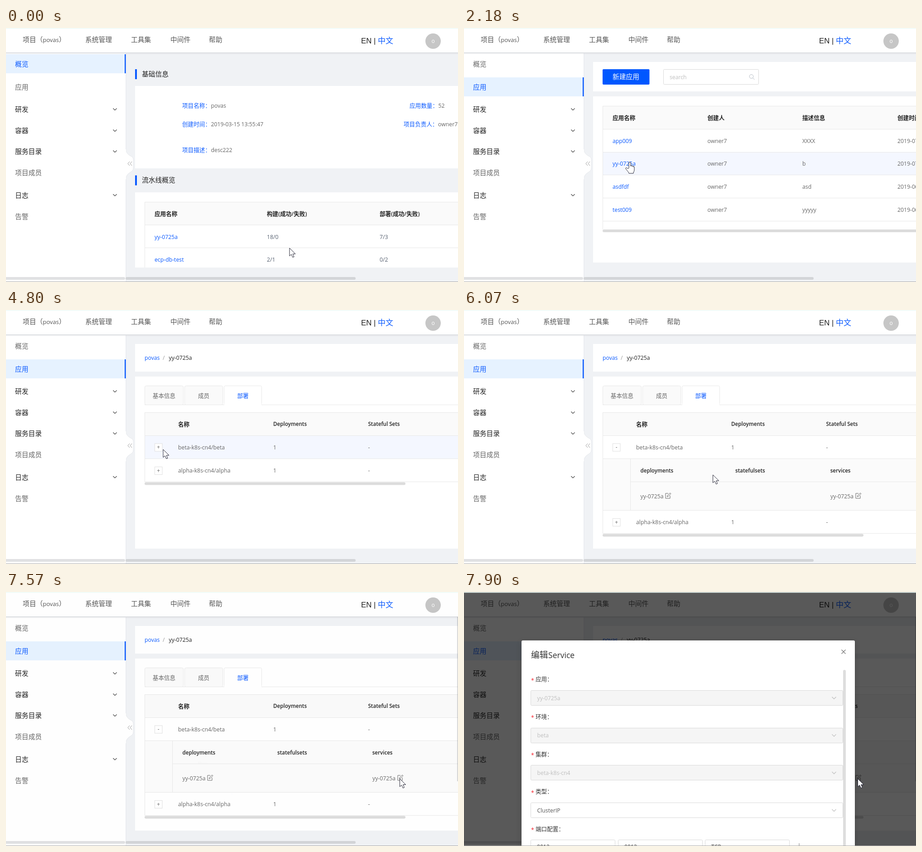
An HTML page that plays this animation: 998 px wide and 561 px high, repeating every 8 s.

```html
<!DOCTYPE html>
<html lang="zh-CN">
<head>
<meta charset="utf-8">
<style>
html, body { margin: 0; width: 100%; height: 100%; overflow: hidden; background: #fff }
svg { display: block; width: 998px; height: 561px; font-family: "Open Sans", "Noto Sans CJK SC", "Noto Sans CJK", sans-serif; white-space: pre }
.card { filter: drop-shadow(0 4px 6px rgba(0, 0, 0, .2)) }
</style>
</head>
<body>
<svg id="stage" viewBox="0 0 998 561"></svg>
<script>
const LOOP = 8000, BLUE = '#0b5aff', GREY = '#666', DARK = '#222', LINE = '#e8e8e8', PAGE = '#f0f2f5', HOVER = '#f4f7ff';
const PROJECT = 'povas', USER = 'owner7', APP = 'yy-0725a';
const LATIN = 12.25, HAN = 12.6, BIG = 14.75;

const rect = (x, y, w, h, fill, more = '') =>
  `<rect x="${x}" y="${y}" width="${w}" height="${h}" fill="${fill}" ${more}/>`;
const text = (s, x, cy, fill = GREY, size = /[^\x00-\x7f]/.test(s) ? HAN : LATIN, more = '') =>
  `<text x="${x}" y="${cy + size * .37}" font-size="${size}" fill="${fill}" ${more}>${s}</text>`;
const stroke = (d, color, width = 1) => `<path d="${d}" fill="none" stroke="${color}" stroke-width="${width}"/>`;
const box = (x, y, w, h, fill, edge, r = 0) =>
  rect(x + .5, y + .5, w - 1, h - 1, fill, `stroke="${edge}" rx="${r}"`);
const hline = (y, x = 306) => rect(x, y, 998 - x, 1, LINE);
const head = (s, x, cy) => text(s, x, cy, DARK, /[^\x00-\x7f]/.test(s) ? HAN : 11.6, 'font-weight="600"');
const chevron = (x, y, color, r = 4) => stroke(`M${x - r} ${y - r / 2}l${r} ${r}l${r} ${-r}`, color, 1.2);
const panel = (y, h) => rect(285, y, 713, h, '#fff');
const bar = (x, y, w, fill) => rect(x, y, w, 6, fill, 'rx="3"');

// time, x, y of the pointer's tip
const PATH = [
  [70, 626, 486], [610, 40, 132], [860, 40, 132], [1540, 230, 190], [1620, 230, 190],
  [2180, 366, 296], [2710, 366, 296], [3280, 541, 176], [3420, 541, 176], [3600, 541, 188],
  [3960, 541, 188], [4350, 450, 330], [4740, 352, 312], [4800, 347, 308], [5040, 335, 305],
  [5690, 335, 305], [6460, 771, 425], [6610, 852, 416], [6790, 852, 416], [6850, 855, 418],
  [7020, 855, 418], [7340, 871, 413], [7510, 871, 413], [7570, 869.5, 412.5], [8000, 869.5, 412.5]];
const HANDS = [[560, 1000], [2080, 2310], [3200, 4020], [6530, 7570]];

function pointerAt(t) {
  const i = PATH.findIndex(p => p[0] > t);
  if (i < 1) return PATH[0].slice(1);
  const [t0, x0, y0] = PATH[i - 1], [t1, x1, y1] = PATH[i];
  const p = (t - t0) / (t1 - t0), e = p * p * (3 - 2 * p);
  return [x0 + (x1 - x0) * e, y0 + (y1 - y0) * e];
}

function pointer(t, [x, y]) {
  const hand = HANDS.some(([a, b]) => t >= a && t < b);
  const d = hand
    ? 'M-2 13V2a2 2 0 0 1 4 0V9c0-2 3-2 3 0v1c0-2 3-2 3 0v1c0-2 2-2 2 1V17c0 4-2 5-2 8H-2c0-3-7-9-7-11c0-2 3-2 5 1z'
    : 'M0 0V17.5L4 14L7 20.5L10 19.3L7.2 13H13z';
  return `<path transform="translate(${x} ${y})" d="${d}" fill="#fff" stroke="#223" stroke-linejoin="round"/>`;
}

function spinner(x, y, angle, r, tones) {
  return tones.map((o, i) => {
    const a = (angle + i * 90) * Math.PI / 180;
    return `<circle cx="${x + r * Math.cos(a)}" cy="${y + r * Math.sin(a)}" r="3.5" fill="${BLUE}" opacity="${o}"/>`;
  }).join('');
}

function header() {
  const nav = [['系统管理', 175], ['工具集', 276], ['中间件', 363], ['帮助', 448]];
  return rect(0, 54, 998, 1, '#d6d8dc') + rect(0, 55, 998, 1, '#e2e4e8') + rect(0, 56, 998, 2, '#000', 'opacity=".03"')
    + rect(0, 0, 998, 54, '#fff')
    + text(`项目（<tspan font-size="13" font-weight="400">${PROJECT}</tspan>）`, 37, 26, '#555', BIG, 'font-weight="300"')
    + nav.map(([s, x]) => text(s, x, 26, '#555', BIG, 'font-weight="300"')).join('')
    + text('EN |', 784, 28, DARK, 16.8, 'font-family="Liberation Sans, sans-serif"')
    + text('中文', 821, 28, BLUE, 17)
    + '<circle cx="943" cy="29" r="17" fill="#c6c6c6"/>'
    + text(USER[0], 943, 29, '#fff', 12, 'text-anchor="middle"');
}

function sidebar(active, hovered) {
  const items = [['概览', 80], ['应用', 130.5], ['研发', 180, 1], ['容器', 227, 1], ['服务目录', 273, 1],
    ['项目成员', 320], ['日志', 369.5, 1], ['告警', 416.5]];
  const top = active ? 109 : 58;
  return rect(0, 54, 264, 507, '#fff') + rect(264, 54, 2, 507, '#ebedf1')
    + '<path d="M264 268Q266 278 274 282Q281 285 281 290V310Q281 315 274 319Q266 323 264 334z" fill="#fff" stroke="#e6e8ec"/>'
    + rect(262, 268, 3, 66, '#fff')
    + stroke('M273 295l-4 4.5l4 4.5M278 295l-4 4.5l4 4.5', '#999')
    + rect(0, top, 264, 42, '#e6f2ff') + rect(262, top, 2.5, 42, BLUE)
    + items.map(([s, y, open], i) =>
      text(s, 20, y, i == active || i == hovered ? BLUE : open ? DARK : GREY, BIG, open ? '' : 'font-weight="300"')
      + (open ? chevron(240.5, y - .5, '#444') : '')).join('');
}

function overview() {
  const title = (s, y) => rect(285, y - 11, 4, 22, BLUE) + text(s, 300, y - .5, DARK, BIG);
  const facts = [['项目名称：', PROJECT, 389, 171], ['应用数量：', '52', 891, 171],
    ['创建时间：', '2019-03-15 13:55:47', 389, 212], ['项目负责人：', USER, 878, 212],
    ['项目描述：', 'desc222', 389, 269]];
  const rows = [[APP, '18/0', '7/3', 461], ['ecp-db-test', '2/1', '0/2', 511.5]];
  return title('基础信息', 102) + panel(128, 182)
    + facts.map(([k, v, x, y]) => text(k, x, y, BLUE) + text(v, x + k.length * HAN + .5, y)).join('')
    + title('流水线概览', 336.5) + panel(363, 166)
    + rect(306, 384, 692, 51, '#fafafa') + rect(306, 384, 1, 145, LINE) + [384, 434.5, 485].map(y => hline(y)).join('')
    + head('应用名称', 328, 410) + head('构建(成功/失败)', 576, 410) + head('部署(成功/失败)', 825, 410)
    + rows.map(([a, b, c, y]) => text(a, 328, y, BLUE) + text(b, 576, y, '#566070') + text(c, 825, y, '#566070')).join('');
}

function list([px, py]) {
  const cols = [328, 537.5, 747, 957], step = 50.7;
  const rows = [['app009', 'XXXX', '2019-07-26'], [APP, 'b', '2019-07-25'], ['asdfdf', 'asd', '2019-06-20'], ['test009', 'yyyyy', '2019-06-18']];
  const row = Math.floor((py - 223) / step);
  return panel(75, 65) + rect(306, 91, 103.5, 34, '#0057ff', 'rx="2"')
    + text('新建应用', 328, 108, '#fff', BIG, 'font-weight="500"')
    + box(440, 91, 211, 34, '#fff', '#d9d9d9', 2) + text('search', 454, 108.5, '#bfbfbf')
    + '<circle cx="634.5" cy="107" r="4.3" fill="none" stroke="#b5bcc4"/>' + stroke('M637.5 110l4 4', '#b5bcc4')
    + panel(151, 367) + rect(306, 172, 692, 51, '#fafafa')
    + (px > 306 && row >= 0 && row < 4 ? rect(306, 223 + row * step, 692, step, HOVER) : '')
    + rect(306, 172, 1, 273, LINE) + hline(172)
    + [0, 1, 2, 3, 4].map(i => hline(223 + Math.round(i * step))).join('')
    + ['应用名称', '创建人', '描述信息', '创建时间'].map((s, i) => head(s, cols[i], 198)).join('')
    + rows.map(([name, desc, date], i) => [name, USER, desc, date].map((s, j) =>
      text(s, cols[j], 249 + i * step, j ? GREY : BLUE)).join('')).join('')
    + bar(306, 445, 700, '#dcdcdc');
}

function detail(active) {
  const tabs = [['基本信息', 306, 86], ['成员', 394, 85], ['部署', 481, 84]];
  return panel(75, 61) + text(PROJECT, 306, 105.5, BLUE) + text('/', 346, 105.5, '#999') + text(APP, 359.5, 105.5, DARK)
    + panel(147, 380) + hline(209)
    + tabs.map(([s, x, w], i) => box(x, 167, w, 43, i == active ? '#fff' : '#fafafa', LINE, 3)
      + (i == active ? rect(x + 1, 207, w - 2, 4, '#fff') : '')
      + text(s, x + w / 2, 189, i == active ? BLUE : GREY, HAN, 'text-anchor="middle"')).join('');
}

const editIcon = (x, y, color) =>
  stroke(`M${x + 7} ${y - 5}h-6v11h10v-6M${x + 4.5} ${y + 2.5}l.5-2.5l6-6l1.8 1.8l-6 6z`, color);

function deploy(t, [px, py]) {
  const open = t >= 5370, linked = t >= 6530 && t < 7570, shift = open ? 114 : 0;
  const nested = py > 379 && t < 7570;
  const toggle = (y, sign, color) => box(328, y - 9, 17.5, 18, '#fff', color == BLUE ? BLUE : '#e0e0e0')
    + text(sign, 336.8, y - .5, color, 12, 'text-anchor="middle"');
  const row = (name, y) => text(name, 380, y) + text('1', 590, y) + text('-', 799.5, y);
  const first = py > 277 && py < 328, second = !open && py >= 328 && py < 380;
  let s = rect(306, 226, 692, 51, '#fafafa');
  if (first || second) s += rect(306, first ? 277 : 328, 692, 51, HOVER);
  s += head('名称', 380, 252) + head('Deployments', 590, 252) + head('Stateful Sets', 799.5, 252)
    + toggle(303.5, open ? '-' : '+', t > 5040 && t < 5690 ? BLUE : GREY) + row('beta-k8s-cn4/beta', 303)
    + toggle(355 + shift, '+', GREY) + row('alpha-k8s-cn4/alpha', 354.5 + shift);
  if (open) {
    s += rect(306, 328, 692, 114, '#fbfbfb') + rect(368, 379, 630, 63, nested ? '#f1f5ff' : '#fbfbfb')
      + rect(367, 328, 1, 114, LINE) + hline(379, 367) + hline(442)
      + ['deployments', 'statefulsets', 'services'].map((h, i) => head(h, 389.5 + i * 209.6, 354.5)).join('')
      + text(APP, 389.5, 411) + editIcon(444, 410, GREY)
      + text(APP, 809, 411, linked ? BLUE : GREY) + editIcon(864, 410, linked ? BLUE : GREY);
  }
  return s + rect(306, 226, 1, 154 + shift, LINE) + [226, 277, 328, 379 + shift].map(y => hline(y)).join('')
    + bar(306, 380.5 + shift, 576, '#dcdcdc');
}

function form() {
  const step = 82.7, fields = [['应用', APP], ['环境', 'beta'], ['集群', 'beta-k8s-cn4'], ['类型', 'ClusterIP'], ['端口配置']];
  const ports = [['8013', 147], ['8013', 340], ['TCP', 532]];
  return fields.map(([label, value], i) => {
    const y = 193 + i * step, off = i < 3;
    return text('*', 148, y + 2, '#f5222d') + text(label + '：', 158, y - .5, '#333', HAN)
      + (value ? box(147, Math.round(y + 24), 690, 34, off ? '#f5f5f5' : '#fff', '#d9d9d9', 2)
        + text(value, 161.5, y + 41, off ? '#bfbfbf' : '#555') + chevron(817, y + 41, '#bbb', 4.5) : '');
  }).join('')
    + ports.map(([s, x]) => box(x, 547, 187, 34, '#fff', '#d9d9d9', 2) + text(s, x + 14, 562, '#333')).join('')
    + stroke('M740 555v12M734 561h12', '#777')
    + rect(837, 172, 6, 420, '#dedede', 'rx="3"');
}

function modal(t) {
  const p = Math.min(1, (t - 7570) / 200), e = 1 - (1 - p) ** 4.4, mask = .65 * (1 - (1 - p) ** 1.65);
  const scale = .2 + .8 * e;
  return rect(996, 55, 2, 363, '#000', 'opacity=".15"') + rect(0, 1, 998, 560, '#000', `opacity="${mask}"`)
    + `<g opacity="${e}" transform="translate(500 444) scale(${scale}) translate(-500 -444)">`
    + rect(127, 107, 736, 600, '#fff', 'rx="3" class="card"')
    + text('编辑', 148, 139.5, '#333', 18.8, 'font-weight="300"') + text('Service', 186, 139.5, '#333', 17.6)
    + stroke('M833.5 127.5l9 9m0-9l-9 9', '#777', 1.3)
    + (t < 7820 ? spinner(494.5, 449.5, 45 + (t - 7650) * .3, 8, [.45, .45, .45, .45]) : form()) + '</g>';
}

function view(t) {
  const at = pointerAt(t), listed = t >= 760;
  let s = rect(0, 0, 998, 561, PAGE);
  if (!listed) s += overview();
  else if (t < 2310) s += list(at);
  else {
    s += detail(t < 3420 ? 0 : 2);
    if (t >= 3730) s += deploy(t, at);
    else if (t >= 3420) s += spinner(808, 437, (t - 3650) * .3 - 10, 8.6, [.55, .33, .33, .33]);
  }
  s += sidebar(listed ? 1 : 0, t >= 560 && t < 1000 ? 1 : -1) + header()
    + bar(-3, 550, 266, '#e0e1e3') + bar(264, 550, 508, '#d3d5d8');
  if (t >= 7570) s += modal(t);
  return s + rect(0, 0, 998, 1.5, '#ecfbf7') + rect(0, 560, 998, 1, '#a8a8a8') + pointer(t, at);
}

const stage = document.getElementById('stage');
function frame() {
  stage.innerHTML = view(performance.now() % LOOP);
  requestAnimationFrame(frame);
}
frame();
</script>
</body>
</html>
```
